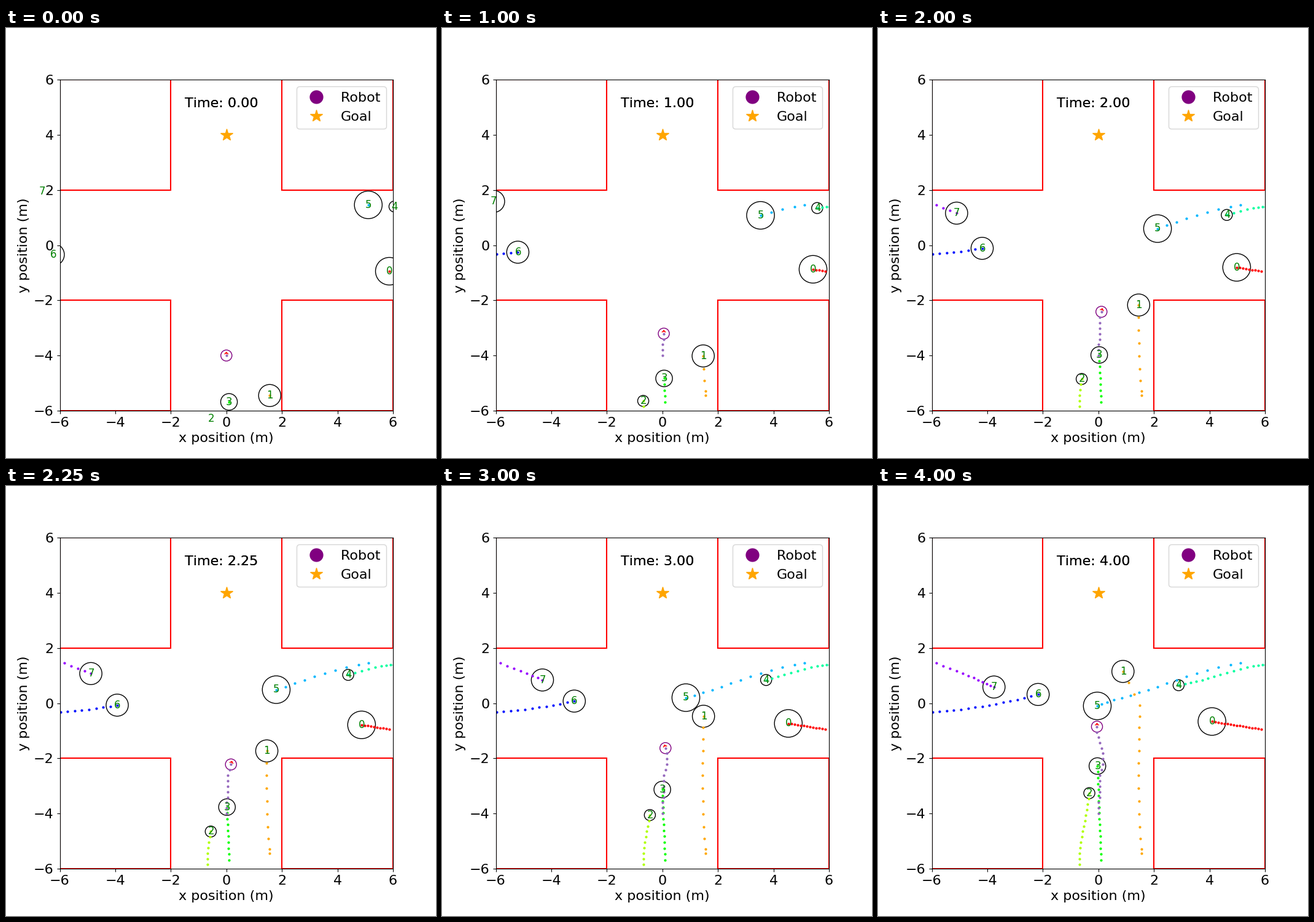
A matplotlib script that plays this animation: 700 by 700 pixels, repeating every 4250 ms.

```python
import numpy as np
import matplotlib.pyplot as plt
from matplotlib.animation import FuncAnimation
from matplotlib.patches import ArrowStyle, Circle, FancyArrowPatch, Rectangle

STEPS = 17
DT = 0.25
ROBOT_SPEED = 0.8
ROBOT_RADIUS = 0.2
LABEL_SHIFT = 0.11

plt.rcParams.update({"font.family": "DejaVu Sans", "text.kerning_factor": 6})
fig = plt.figure(figsize=(7, 7), dpi=100)
ax = fig.add_subplot()
ax.set(xlim=(-6, 6), ylim=(-6, 6))
ax.tick_params(labelsize=16)
ax.set_xlabel("x position (m)", fontsize=16)
ax.set_ylabel("y position (m)", fontsize=16)

for corner in [(-6, 2), (2, 2), (-6, -6), (2, -6)]:
    ax.add_patch(Rectangle(corner, 4, 4, fill=False, ec="red", lw=1.5))

goal, = ax.plot(0, 4, "*", color="orange", ms=15)
robot_key, = ax.plot([], [], "o", color="purple", ms=15)
ax.legend([robot_key, goal], ["Robot", "Goal"], fontsize=16, loc="upper right")

# Two stacked copies give the clock its heavier edge.
clocks = [ax.text(-1.5, 5, "", fontsize=16) for _ in range(2)]

steps = np.arange(STEPS)


def walk(*keys, lag=0):
    """Smooth path through evenly timed points; lag softens the start."""
    pace = steps - lag * (1 - np.exp(-steps / lag)) if lag else steps
    at = pace[::(STEPS - 1) // (len(keys) - 1)]
    return [np.polyval(np.polyfit(at, c, len(keys) - 1), pace) for c in zip(*keys)]


def turn_left(path, start, drift):
    x, y = path
    return x - drift * np.maximum(steps - start, 0), y


def steer():
    """Constant speed; only the sideways position is planned."""
    x = np.interp(steps, [2, 3, 7, 9, 11, 15], [0, 0.05, 0.055, 0.165, 0.165, -0.05])
    rise = np.sqrt((ROBOT_SPEED * DT) ** 2 - np.diff(x) ** 2)
    return x, -4 + np.append(0, np.cumsum(rise))


class Agent:
    def __init__(self, path, radius, edge, color, label=""):
        self.x, self.y = path
        self.body = ax.add_patch(Circle((0, 0), radius, fill=False, ec=edge, lw=1))
        self.trail, = ax.plot([], [], ".", color=color, ms=4)
        self.label = ax.text(0, 0, label, color="green", fontsize=12)

    def show(self, i):
        x, y = self.x[i], self.y[i]
        self.body.center = x, y
        self.trail.set_data(self.x[:i + 1], self.y[:i + 1])
        self.label.set_position((x - LABEL_SHIFT, y - LABEL_SHIFT))


hues = plt.get_cmap("hsv", 10)
agents = []


def add_person(radius, path):
    n = len(agents)
    agents.append(Agent(path, radius, "black", hues(n), str(n)))


add_person(0.5, walk((5.87, -0.945), (4.09, -0.665)))
add_person(0.4, turn_left(walk((1.56, -5.45), (1.47, -4.015), (1.45, -2.17),
                               (1.48, -0.475), (1.485, 1.15), lag=1), 13, 0.2))
add_person(0.2, walk((-0.555, -6.29), (-0.69, -5.645), (-0.6, -4.85),
                     (-0.45, -4.055), (-0.325, -3.26), lag=1))
add_person(0.3, walk((0.095, -5.68), (-0.035, -2.28)))
add_person(0.2, walk((6.055, 1.4), (5.575, 1.345), (4.625, 1.095),
                     (3.735, 0.84), (2.89, 0.65), lag=2))
add_person(0.5, walk((5.11, 1.46), (3.535, 1.08), (2.13, 0.6),
                     (0.846, 0.2), (-0.04, -0.1), lag=0.25))
add_person(0.4, walk((-6.235, -0.345), (-4.185, -0.115), (-2.17, 0.315)))
add_person(0.4, walk((-6.64, 1.95), (-6.08, 1.585), (-5.105, 1.16),
                     (-4.32, 0.84), (-3.76, 0.585), lag=2))

robot = Agent(steer(), ROBOT_RADIUS, "purple", "tab:purple")
agents.append(robot)
heading = ax.add_patch(FancyArrowPatch(
    (0, -4), (0, -3.8), color="red",
    arrowstyle=ArrowStyle("->", head_length=2, head_width=2)))


def update(i):
    for agent in agents:
        agent.show(i)
    # The robot faces along its latest move.
    k = max(i, 1)
    angle = np.arctan2(robot.y[k] - robot.y[k - 1], robot.x[k] - robot.x[k - 1])
    x, y = robot.x[i], robot.y[i]
    heading.set_positions((x, y), (x + ROBOT_RADIUS * np.cos(angle),
                                   y + ROBOT_RADIUS * np.sin(angle)))
    for clock in clocks:
        clock.set_text(f"Time: {i * DT:.2f}")


anim = FuncAnimation(fig, update, frames=STEPS, interval=250, repeat=True)
plt.show()
```
